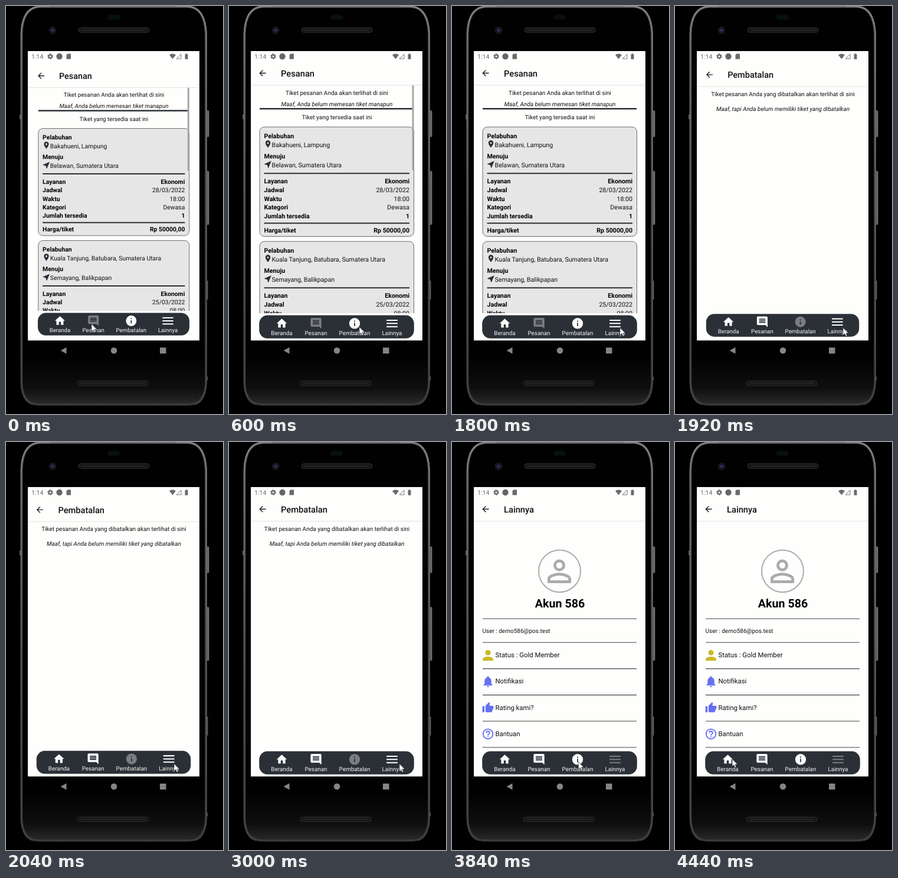
An HTML page that plays this animation: 368x688 px, repeating every 4560 ms.

```html
<!DOCTYPE html>
<html lang="id">
<head>
<meta charset="utf-8">
<title>Tiket</title>
<style>
html, body { margin: 0; width: 100%; height: 100%; overflow: hidden; background: #000; }
svg { display: block; }
text { font: 10px Roboto, sans-serif; fill: #111; text-rendering: geometricPrecision; }
.title { font-size: 14.7px; font-weight: 500; }
.row { font-size: 10.65px; }
.bold { font-size: 10.65px; font-weight: 700; fill: #000; }
.item { font-size: 11.35px; }
.name { font-size: 19.7px; font-weight: 700; fill: #000; }
.it { font-size: 10.05px; font-style: italic; }
.tab { font-size: 9.9px; fill: #f4f4f4; }
.clock { font-size: 10.6px; fill: #6b6b6b; }
</style>
</head>
<body>
<svg id="stage" width="368" height="688" viewBox="0 0 368 688" xmlns="http://www.w3.org/2000/svg">
  <defs>
    <linearGradient id="rim" x2="0" y2="1">
      <stop offset="0" stop-color="#6c6c6c"/>
      <stop offset=".1" stop-color="#585858"/>
      <stop offset=".55" stop-color="#404040"/>
      <stop offset="1" stop-color="#3a3a3a"/>
    </linearGradient>
    <linearGradient id="edge" x2="0" y2="1">
      <stop offset="0" stop-color="#8c8c8c"/>
      <stop offset=".5" stop-color="#6c6c6c"/>
      <stop offset="1" stop-color="#4a4a4a"/>
    </linearGradient>
    <linearGradient id="glass" x2="0" y2="1">
      <stop offset=".88" stop-color="#010101"/>
      <stop offset=".96" stop-color="#0f0f0f"/>
      <stop offset="1" stop-color="#2a2a2a"/>
    </linearGradient>
    <clipPath id="screen"><rect x="37" y="76" width="291" height="488"/></clipPath>
    <clipPath id="list"><rect x="37" y="134" width="291" height="384"/></clipPath>
  </defs>
  <rect width="368" height="688"/>
  <g fill="#5a5a5a">
    <rect x="339" y="176" width="5.500" height="45" rx="1.500"/>
    <rect x="339" y="278" width="5.500" height="91" rx="1.500"/>
    <rect x="340" y="463" width="2.500" height="32" rx="1"/>
    <rect x="339" y="625" width="3" height="6"/>
    <rect x="23" y="183" width="3" height="8"/>
  </g>
  <path d="M343 178v41M343 280v87" stroke="#858585"/>
  <path d="M58 1Q28 2 26.500 46V636Q28 672 56 672H310Q337 672 339 636V46Q337 2 308 1Z" fill="url(#glass)" stroke="url(#rim)" stroke-width="3.500"/>
  <path d="M74 .5H58Q27 2 25.500 46V636Q27 668 46 672M320 672Q338 668 340 636V46Q338 2 308 .5H290" fill="none" stroke="url(#edge)" stroke-width="1.300"/>
  <rect x="172" y="15" width="21" height="8" rx="4" fill="#07100d"/>
  <circle cx="79" cy="41" r="6.500" fill="#15151c"/>
  <circle cx="79" cy="41" r="3.500" fill="#1e1e3c"/>
  <circle cx="79" cy="41" r="1.300" fill="#4a4a86"/>
  <g fill="#151515" stroke="#303030">
    <rect x="123" y="36.500" width="120" height="8" rx="4"/>
    <rect x="121" y="632.500" width="120" height="7.500" rx="3.700"/>
  </g>
  <path d="M128 40.500H238M126 636.300H236" stroke="#262626" stroke-width="2"/>
  <g fill="#858585">
    <path d="M102.500 575.500v11L92.500 581z"/>
    <circle cx="183" cy="581" r="5.300"/>
    <rect x="261" y="576" width="10.500" height="10"/>
  </g>
  <rect x="37" y="76" width="291" height="488" fill="#fefefd"/>
  <g clip-path="url(#screen)"><g id="pages"></g></g>
  <g id="status" fill="#6b6b6b">
    <text class="clock" x="43" y="88.800">1:14</text>
    <g fill="none" stroke="#6b6b6b">
      <circle cx="75" cy="85" r="2.600" stroke-width="2.200"/>
      <circle cx="75" cy="85" r="4" stroke-width="1.500" stroke-dasharray="2.400 1.790"/>
    </g>
    <circle cx="90.500" cy="85" r="5.200" fill="#666"/>
    <path d="M104.500 80.500h5.500v9h-7.500v-7z"/>
    <path d="M277 82.500q5.500-4.200 11 0L282.500 89.500z"/>
    <path d="M297 81v8h-8z" fill="none" stroke="#777"/>
    <path d="M305 80.200h2v1h1.500v8.500h-5v-8.500h1.500z"/>
  </g>
  <path id="cursor" d="M0 0V12.500L2.900 9.900 4.900 14.300 6.900 13.400 5 9.200H9Z" fill="#fff" stroke="#222" stroke-width=".6"/>
</svg>
<script>
const LOOP = 4560, STEP = 120;
const DARK = '#2a3036';
const icons = {
  home: 'M10 20v-6h4v6h5v-8h3L12 3 2 12h3v8z',
  chat: 'M20 2H4a2 2 0 0 0-2 2v12a2 2 0 0 0 2 2h14l4 4V4a2 2 0 0 0-2-2zM18 14H6v-2h12zM18 11H6V9h12zM18 8H6V6h12z',
  info: 'M12 2a10 10 0 1 0 0 20 10 10 0 0 0 0-20zM13 17h-2v-6h2zM13 9h-2V7h2z',
  menu: 'M1.500 5h21v2.300h-21zM1.500 11h21v2.300h-21zM1.500 17h21v2.300h-21z',
  pin: 'M12 1a7.500 7.500 0 0 0-7.500 7.500C4.500 14.500 12 23 12 23s7.500-8.500 7.500-14.500A7.500 7.500 0 0 0 12 1zM12 11.500a2.700 2.700 0 1 1 0-5.400 2.700 2.700 0 0 1 0 5.400z',
  plane: 'M22 2L2 10.500v1l8 2.500 2.500 8h1z',
  person: 'M12 12a4 4 0 1 0 0-8 4 4 0 0 0 0 8zM12 14c-2.700 0-8 1.300-8 4v2h16v-2c0-2.700-5.300-4-8-4z',
  bell: 'M12 22a2 2 0 0 0 2-2h-4a2 2 0 0 0 2 2zM18 16v-5c0-3.100-1.600-5.600-4.500-6.300V4a1.500 1.500 0 0 0-3 0v.7C7.600 5.400 6 7.900 6 11v5l-2 2v1h16v-1z',
  thumb: 'M1 21h4V9H1zM23 10a2 2 0 0 0-2-2h-6.300l1-4.600v-.3c0-.4-.2-.8-.4-1L14.200 1 7.600 7.600C7.200 8 7 8.500 7 9v10a2 2 0 0 0 2 2h9c.8 0 1.500-.5 1.800-1.200l3-7c.1-.3.2-.5.2-.8z',
  help: 'M12 2a10 10 0 1 0 0 20 10 10 0 0 0 0-20zM12 20a8 8 0 1 1 0-16 8 8 0 0 1 0 16zM11 16h2v2h-2zM12 6a4 4 0 0 0-4 4h2a2 2 0 1 1 4 0c0 2-3 1.800-3 5h2c0-2.200 3-2.500 3-5a4 4 0 0 0-4-4z',
  avatar: 'M12 5.900a2.100 2.100 0 1 1 0 4.200 2.100 2.100 0 0 1 0-4.200M12 14.900c3 0 6.100 1.500 6.100 2.100v1.100H5.900V17c0-.6 3.100-2.100 6.100-2.100M12 4a4 4 0 1 0 0 8 4 4 0 0 0 0-8zM12 13c-2.700 0-8 1.300-8 4v3h16v-3c0-2.700-5.300-4-8-4z'
};

const icon = (name, cx, cy, size, fill) =>
  `<path transform="translate(${cx - size / 2} ${cy - size / 2}) scale(${size / 24})" d="${icons[name]}" fill="${fill}" fill-rule="evenodd"/>`;
const text = (s, x, y, cls = '', anchor = 'start') =>
  `<text x="${x}" y="${y}" class="${cls}" text-anchor="${anchor}">${s}</text>`;
const centered = (s, y, cls) => text(s, 183, y, cls, 'middle');
const rule = (y, w, color, x1 = 52, x2 = 313) =>
  `<path d="M${x1} ${y}H${x2}" stroke="${color}" stroke-width="${w}"/>`;

const tabs = [
  ['Beranda', 'home', 89.5, 21],
  ['Pesanan', 'chat', 147.5, 22],
  ['Pembatalan', 'info', 213, 22],
  ['Lainnya', 'menu', 276.5, 21.5]
];

function tabBar(active) {
  return `<rect x="51.200" y="521.600" width="262.600" height="38.900" rx="14" fill="${DARK}"/>` +
    tabs.map(([label, name, x, size]) =>
      icon(name, x, 535.2, size, label === active ? '#7b7d80' : '#fff') +
      text(label, x, 555, 'tab', 'middle')).join('');
}

function page(title, content) {
  return `<g class="page"><rect x="37" y="92" width="291" height="472" fill="#fefefd"/>` +
    rule(133.5, 1, '#e2e2e2', 37, 328) +
    '<path d="M62.500 113.300H52.500M57.300 108.300L52.300 113.300 57.300 118.300" fill="none" stroke="#222" stroke-width="1.400"/>' +
    text(title, 88, 118.7, 'title') + content + tabBar(title) + '</g>';
}

function ticket(top, from, to, date, time) {
  const rows = [['Layanan', 'Ekonomi'], ['Jadwal', date], ['Waktu', time],
    ['Kategori', 'Dewasa'], ['Jumlah tersedia', '1']];
  return `<g transform="translate(0 ${top})">` +
    `<rect x="52" y="0" width="261.500" height="184.500" rx="8" fill="#e6e6e6" stroke="#6c6c6c"/>` +
    text('Pelabuhan', 59.5, 19, 'bold') + icon('pin', 66, 28.8, 13.5, DARK) + text(from, 72.5, 34.3, 'row') +
    text('Menuju', 59.5, 53, 'bold') + icon('plane', 66, 63.2, 14, DARK) + text(to, 72.5, 67.8, 'row') +
    rule(78.2, 2, DARK, 59.5, 306) +
    rows.map(([label, value], i) => {
      const y = 95.4 + i * 14.6;
      return text(label, 59.5, y, 'bold') + text(value, 306, y, i % 4 ? 'row' : 'bold', 'end');
    }).join('') +
    rule(162.2, 2, DARK, 59.5, 306) +
    text('Harga/tiket', 59.5, 177.7, 'bold') + text('Rp 50000,00', 306, 177.7, 'bold', 'end') + '</g>';
}

const orders = page('Pesanan', '<g clip-path="url(#list)">' +
  centered('Tiket pesanan Anda akan terlihat di sini', 149.6) +
  centered('Maaf, Anda belum memesan tiket manapun', 168.8, 'it') +
  rule(173.3, 2.4, DARK) +
  centered('Tiket yang tersedia saat ini', 191) +
  ticket(204, 'Bakahueni, Lampung', 'Belawan, Sumatera Utara', '28/03/2022', '18:00') +
  ticket(397, 'Kuala Tanjung, Batubara, Sumatera Utara', 'Semayang, Balikpapan', '25/03/2022', '08:00') +
  '<rect id="bar" x="310.500" y="134" width="3" height="143" fill="#a6a6a6"/></g>');

const cancels = page('Pembatalan',
  centered('Tiket pesanan Anda yang dibatalkan akan terlihat di sini', 149.6) +
  centered('Maaf, tapi Anda belum memiliki tiket yang dibatalkan', 174.8, 'it'));

const GOLD = '#c9b826', BLUE = '#6670f2';
const items = [
  ['Status : Gold Member', 'person', 27, GOLD],
  ['Notifikasi', 'bell', 23, BLUE],
  ['Rating kami?', 'thumb', 20.5, BLUE],
  ['Bantuan', 'help', 22, BLUE]
];
const more = page('Lainnya',
  '<circle cx="182.500" cy="217.700" r="35.500" fill="none" stroke="#ababab" stroke-width="2"/>' +
  icon('avatar', 182, 218, 60, '#ababab') +
  centered('Akun 586', 279.3, 'name') +
  rule(298, 1.1, '#444') + text('User : demo586@pos.test', 51.5, 321.7) + rule(338, 1.1, '#444') +
  items.map(([label, name, size, color], i) => {
    const y = 359.7 + i * 44.2;
    return icon(name, 61, y, size, color) + text(label, 73.5, y + 3.5, 'item') + rule(y + 22.7, 1.1, '#444');
  }).join(''));

const $ = id => document.getElementById(id);
$('pages').innerHTML = orders + cancels + more;
const pages = [...document.querySelectorAll('.page')];
const opened = [0, 1860, 3360];

// start, end, from x/y, to x/y
const moves = [
  [0, 600, 145, 536, 221, 541],
  [1200, 1800, 221, 541, 285, 542.5],
  [2040, 2400, 285, 542.5, 289, 542.5],
  [3480, 4320, 289, 542.5, 97, 534.5]
];
const clamp = v => Math.min(1, Math.max(0, v));
const ease = p => (1 - Math.cos(Math.PI * p)) / 2;

function draw(t) {
  const now = t >= opened[2] ? 2 : t >= opened[1] ? 1 : 0;
  const age = t - opened[now];
  const scale = age < 480 ? 1 - 0.021 * Math.exp(-age / 109) : 1;
  pages.forEach((p, i) => { p.style.display = i === now ? '' : 'none'; });
  $('pages').setAttribute('transform', `translate(182.700 325) scale(${scale}) translate(-182.700 -325)`);
  $('bar').setAttribute('opacity', clamp((1530 - t) / 330));

  const [a, b, x1, y1, x2, y2] = moves.filter(m => m[0] <= t).pop();
  const k = ease(clamp((t - a) / (b - a)));
  $('cursor').setAttribute('transform', `translate(${x1 + (x2 - x1) * k} ${y1 + (y2 - y1) * k})`);
}

const start = performance.now();
function tick() {
  const t = (performance.now() - start) % LOOP;
  draw(Math.floor(t / STEP) * STEP);
  requestAnimationFrame(tick);
}
tick();
</script>
</body>
</html>
```
